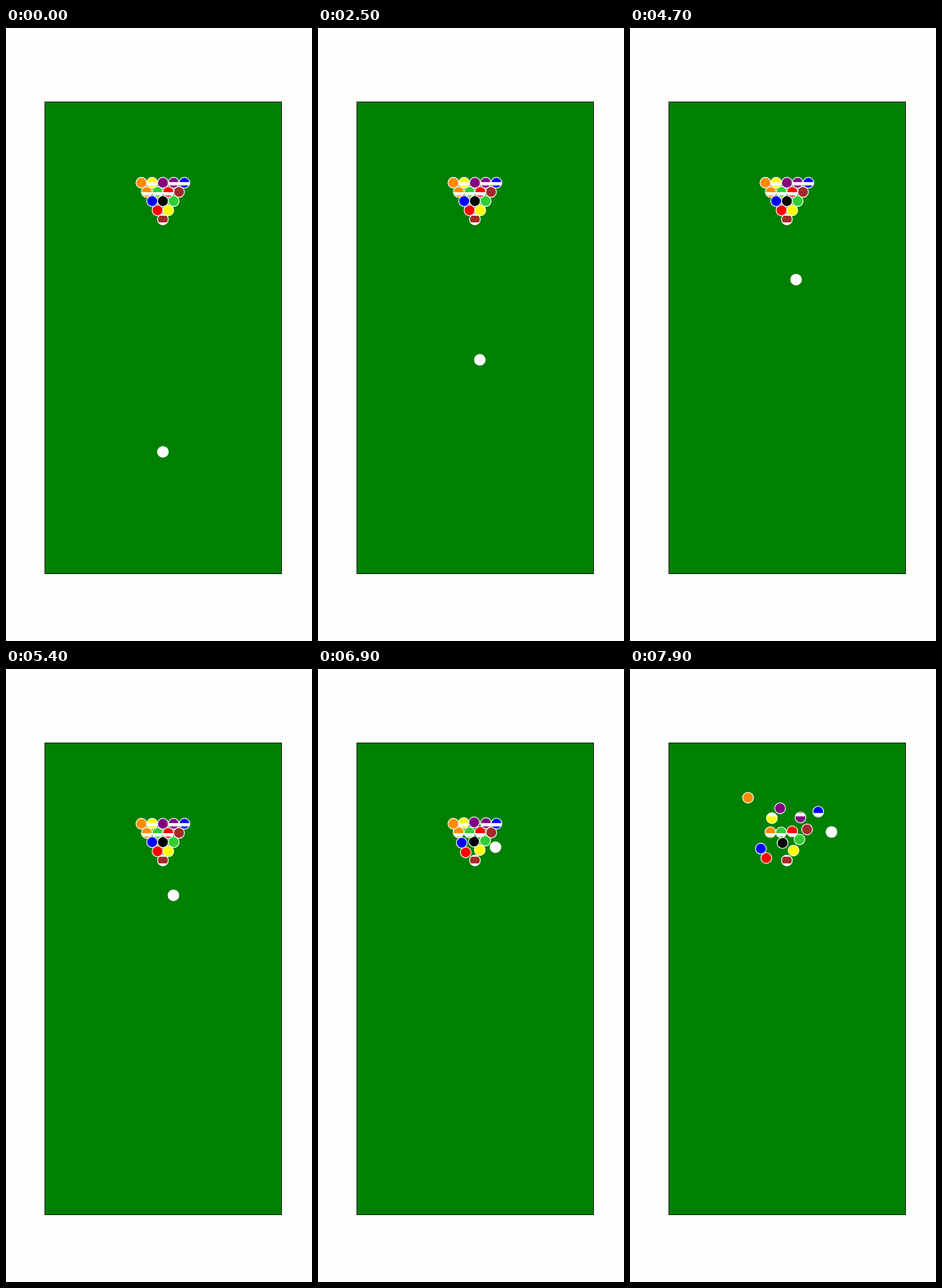
Recreate the animation shown at these times as an HTML page with a canvas. Size 508 by 1016 pixels, loop 8000 ms.

```html
<!DOCTYPE html>
<html lang="en">
<head>
<meta charset="utf-8">
<title>Pool break</title>
<style>
  html, body { margin: 0; width: 100%; height: 100%; overflow: hidden; background: #fefefe; }
  canvas { display: block; width: 508px; height: 1016px; }
</style>
</head>
<body>
<canvas id="stage" width="508" height="1016"></canvas>
<script>
const ctx = document.getElementById('stage').getContext('2d');
const STEP = 100, STEPS = 80;
const HIT = 64, SPREAD = 69, END = 79;
const APEX = { x: 260.5, y: 317.3 }, SPACING = 17.85, ROW = 15.2;
const CUE_START = { x: 260.5, y: 702.5 };
const STRIPE = { origin: 255.4, period: 16.7, height: 5.6 };

// color, striped, step it starts to move, position when the rack opens, position at the end
const balls = [
  ['brown', true, 69, 260.5, 317.3, 260.5, 317.3],
  ['red', false, 64, 245.3, 304, 226.3, 313.3],
  ['yellow', false, 64, 268.5, 300, 271.5, 300.8],
  ['blue', false, 65, 238.6, 288, 217.3, 297.7],
  ['black', false, 65, 259, 286, 253.3, 288.4],
  ['limegreen', false, 64, 277.6, 284.5, 281.3, 282.5],
  ['darkorange', true, 66, 233.3, 270.6, 233.1, 270.4],
  ['limegreen', true, 66, 251.4, 271, 251, 270.8],
  ['red', true, 65, 269.3, 270, 269.3, 269.2],
  ['brown', false, 66, 287.8, 271, 294, 265.8],
  ['darkorange', false, 69, 224.8, 256.5, 196, 213.3],
  ['yellow', true, 66, 242, 255.4, 235.6, 247.2],
  ['purple', false, 67, 259.3, 254.2, 249.2, 230.8],
  ['purple', true, 66, 278.8, 255.5, 282.9, 246.1],
  ['blue', true, 69, 296.2, 256.3, 312.5, 236.5]
].map(([color, striped, start, openX, openY, endX, endY], i) => {
  const row = Math.floor((Math.sqrt(8 * i + 1) - 1) / 2);
  const col = i - row * (row + 1) / 2;
  return {
    color, striped, start,
    home: { x: APEX.x + (col - row / 2) * SPACING, y: APEX.y - row * ROW },
    open: { x: openX, y: openY },
    end: { x: endX, y: endY }
  };
});

const eachAxis = fn => ({ x: fn('x'), y: fn('y') });

function hermite(a, va, b, vb, span, u) {
  const u2 = u * u, u3 = u2 * u;
  return a * (2 * u3 - 3 * u2 + 1) + va * span * (u3 - 2 * u2 + u)
    + b * (3 * u2 - 2 * u3) + vb * span * (u3 - u2);
}

// Accelerate out of the contact, then roll on in a straight line.
function rollOut({ start, home, open, end }, startSpeed, n) {
  return eachAxis(k => {
    const speed = (end[k] - open[k]) / (END - SPREAD);
    if (n >= SPREAD) return open[k] + speed * (n - SPREAD);
    if (n <= start) return home[k];
    const span = SPREAD - start;
    return hermite(home[k], startSpeed[k], open[k], speed, span, (n - start) / span);
  });
}

function cueApproach(n) {
  const travel = 6.135 * n - 0.0013 * n * n;
  return { x: CUE_START.x + 0.0533 * travel, y: CUE_START.y - travel };
}

const cue = {
  start: HIT, home: cueApproach(HIT),
  open: { x: 294.6, y: 295.3 }, end: { x: 334.5, y: 270.1 }
};

const cuePosition = n =>
  n <= HIT ? cueApproach(n) : rollOut(cue, { x: 0.32, y: -5.97 }, n);

function drawBall({ x, y }, color, striped) {
  ctx.beginPath();
  ctx.arc(x, y, 8.95, 0, 2 * Math.PI);
  ctx.fillStyle = color;
  ctx.fill();
  if (striped) {
    // Stripes stay fixed to the table, so the ball seems to roll.
    const { origin, period, height } = STRIPE;
    ctx.save();
    ctx.clip();
    ctx.fillStyle = 'white';
    const first = origin + Math.floor((y - 9 - origin) / period) * period;
    for (let top = first; top < y + 9; top += period) ctx.fillRect(x - 10, top, 20, height);
    ctx.restore();
  }
  ctx.strokeStyle = 'white';
  ctx.lineWidth = 1.35;
  ctx.stroke();
}

function drawTable() {
  ctx.fillStyle = '#fefefe';
  ctx.fillRect(0, 0, 508, 1016);
  ctx.fillStyle = 'green';
  ctx.fillRect(64.5, 122.5, 393, 782);
  ctx.strokeStyle = 'black';
  ctx.lineWidth = 1;
  ctx.strokeRect(64.5, 122.5, 393, 782);
}

function render(time) {
  const n = Math.floor(time / STEP) % STEPS;
  drawTable();
  for (const ball of balls) {
    drawBall(rollOut(ball, { x: 0, y: 0 }, n), ball.color, ball.striped);
  }
  drawBall(cuePosition(n), 'white', false);
}

function tick() {
  render(performance.now());
  requestAnimationFrame(tick);
}
tick();
</script>
</body>
</html>
```
